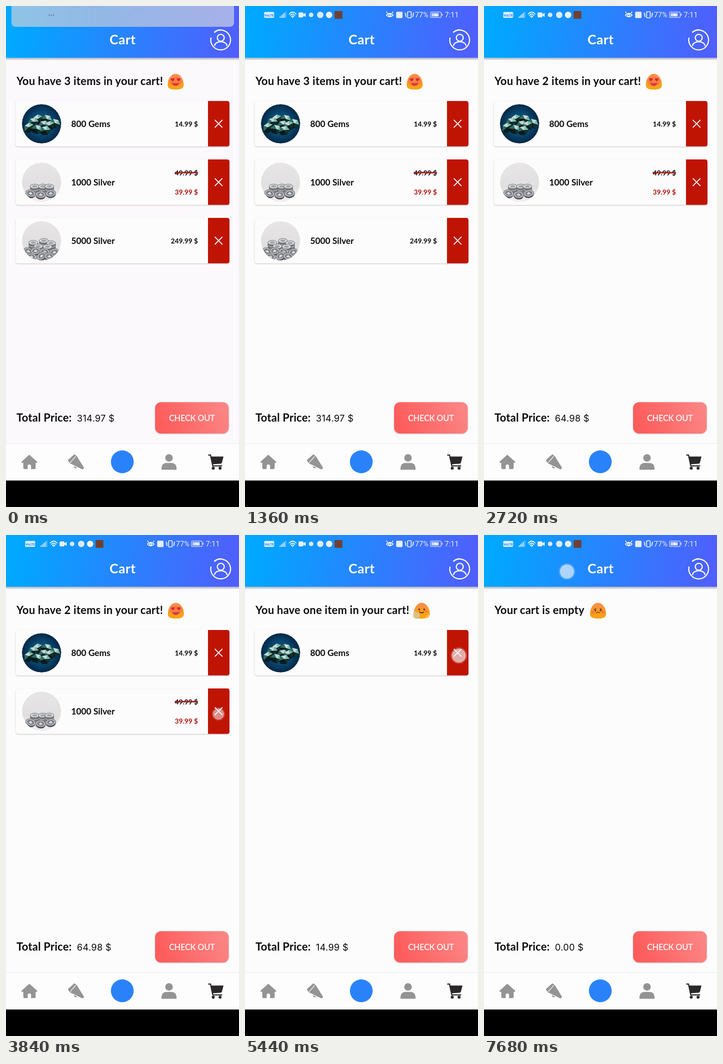
These frames come from a looping animation (511 px wide and 1097 px high, 7760 ms). An HTML page:

```html
<!DOCTYPE html>
<html lang="en">
<head>
<meta charset="utf-8">
<title>Cart</title>
<style>
  html, body { margin: 0; width: 100%; height: 100%; overflow: hidden; background: #000; }
  svg { display: block; width: 100%; height: 100%; }
  text { font-family: Lato, "Open Sans", sans-serif; font-weight: 700; fill: #0b0b0d; white-space: pre; }
  .head { font-size: 24px; letter-spacing: .27px; }
  .name { font-size: 19px; }
  .price { font-size: 15px; text-anchor: end; }
  .bar { font: 400 16px Roboto, sans-serif; fill: #e8f0ff; }
  .sum { font: 400 20px Inter, sans-serif; letter-spacing: .3px; }
  .line { fill: none; stroke: #fff; stroke-linecap: round; stroke-linejoin: round; }
</style>
</head>
<body>
<svg viewBox="0 0 511 1097" preserveAspectRatio="xMinYMin meet">
  <defs>
    <linearGradient id="sky" gradientUnits="userSpaceOnUse" x1="20" y1="30" x2="495" y2="115">
      <stop offset="0" stop-color="#00a8ff"/><stop offset="1" stop-color="#4f5ffd"/>
    </linearGradient>
    <linearGradient id="glass">
      <stop offset="0" stop-color="#8ec4e6"/><stop offset=".4" stop-color="#93b8e6"/><stop offset="1" stop-color="#a7b0ea"/>
    </linearGradient>
    <linearGradient id="coral" x1="0" y1=".3" x2="1" y2=".1">
      <stop offset="0" stop-color="#fd5d5c"/><stop offset="1" stop-color="#fb8887"/>
    </linearGradient>
    <linearGradient id="fade" x1="0" y1="0" x2="0" y2="1">
      <stop offset="0" stop-color="#556" stop-opacity=".45"/><stop offset="1" stop-color="#556" stop-opacity="0"/>
    </linearGradient>
    <linearGradient id="skin" x1="0" y1="0" x2="0" y2="1">
      <stop offset="0" stop-color="#f98a52"/><stop offset=".5" stop-color="#fb9c1e"/><stop offset="1" stop-color="#fca50c"/>
    </linearGradient>
    <radialGradient id="deep">
      <stop offset="0" stop-color="#0c5b8c"/><stop offset=".6" stop-color="#084670"/><stop offset="1" stop-color="#042744"/>
    </radialGradient>
    <linearGradient id="pale" x1="0" y1="0" x2="0" y2="1">
      <stop offset="0" stop-color="#e8e5e6"/><stop offset=".6" stop-color="#e2dfe0"/><stop offset="1" stop-color="#f0eeee"/>
    </linearGradient>
    <clipPath id="round"><circle r="43"/></clipPath>
    <filter id="soft" x="-10%" y="-10%" width="120%" height="130%">
      <feDropShadow dx="0" dy="1" stdDeviation="1.3" flood-color="#3a3550" flood-opacity=".36"/>
    </filter>
    <path id="blob" d="M-17 7C-17-6-10-17 0-17S17-6 17.3 6C17.5 14 12 16.5 0 16.5S-17 14-17 7Z"/>
    <path id="heart" d="M0 4C-7-1-3-5 0-2C3-5 7-1 0 4Z"/>
  </defs>

  <rect id="page" width="511" height="1040"/>
  <rect y="113.500" width="511" height="6" fill="url(#fade)"/>
  <rect width="511" height="113.500" fill="url(#sky)"/>
  <text x="227" y="84" style="font-size:29px;letter-spacing:.5px;fill:#fff">Cart</text>

  <g class="line" stroke-width="2.500">
    <path d="M449.500 70A21.700 21.700 0 1 0 457.500 57.200"/>
    <path d="M457.500 57.200A21.700 21.700 0 0 1 471 52.300"/>
    <circle cx="471" cy="69.500" r="7.600"/>
    <path d="M457.500 86.500C459 75.500 483 75.500 484.500 86.500"/>
  </g>

  <g id="status">
    <rect x="42" y="13" width="22" height="13" rx="2.500" fill="#dcecff"/>
    <text x="53" y="22.500" text-anchor="middle" style="font:700 7.500px Roboto,sans-serif;fill:#178ff5">VoLTE</text>
    <g id="bars" fill="#d8ebff"></g>
    <g class="line" stroke-width="1.800" stroke="#e4f0ff">
      <path d="M97 17.500Q104.500 9.500 112 17.500M99.500 20.500Q104.500 15 109.500 20.500M102 23Q104.500 20.500 107 23"/>
    </g>
    <path d="M104.500 26.500l-2-2.500h4z" fill="#e4f0ff"/>
    <rect x="117.500" y="14" width="10.500" height="11" rx="2" fill="#eaf3ff"/>
    <path d="M128 18l5-3v9l-5-3z" fill="#eaf3ff"/>
    <circle cx="145" cy="19.500" r="5" fill="#d8e8ff"/>
    <circle cx="165" cy="19.500" r="7" fill="#dcebff"/>
    <circle cx="184.500" cy="19.500" r="7" fill="#eef5ff"/>
    <rect x="196.500" y="11" width="17" height="17" fill="#6f3f35"/>
    <g class="line" stroke-width="1.700" stroke="#eef3ff">
      <path d="M310 20Q317.500 12.500 325 20Q317.500 27.500 310 20ZM312 15l-1.500-2M323 15l1.500-2"/>
      <circle cx="317.500" cy="20" r="2.300"/>
      <rect x="356.500" y="12.500" width="8" height="13.500" rx="1.500"/>
      <path d="M351.500 15v2l1.500 1.500l-1.500 1.500l1.500 1.500v2M369.500 15v2l-1.500 1.500l1.500 1.500l-1.500 1.500v2"/>
    </g>
    <rect x="331.500" y="12.500" width="14" height="14" rx="2" fill="#e6edff"/>
    <text class="bar" x="372.500" y="25">77%</text>
    <rect x="406.700" y="13.200" width="23.500" height="12" rx="2.500" fill="none" stroke="#c9d5ff" stroke-width="1.400"/>
    <rect x="409" y="15.500" width="16" height="7.500" rx="1" fill="#c9d5ff"/>
    <path d="M414 20l5-4v3h4l-5 4v-3z" fill="#fff"/>
    <rect x="431.300" y="16.500" width="2" height="5" fill="#c9d5ff"/>
    <text class="bar" x="438" y="25">7:11</text>
  </g>

  <g id="shade">
    <rect x="12.500" y="-20" width="487" height="65" rx="8" fill="url(#glass)" stroke="#b4d0f2" stroke-opacity=".7"/>
    <g fill="#6f7d9c">
      <circle cx="95" cy="20" r="1.500"/><circle cx="99.500" cy="20" r="1.500"/><circle cx="104" cy="20" r="1.500"/>
    </g>
    <path d="M146 2h24M180 2h20M279 7h20" stroke="#8292b8" stroke-opacity=".6" stroke-dasharray="2 2"/>
  </g>

  <text id="title" class="head" x="23" y="172.500"></text>
  <g id="mood"></g>
  <g id="cards"></g>

  <text class="head" x="23" y="910">Total Price:</text>
  <text id="sum" class="sum" x="155.500" y="909.500"></text>
  <rect x="327" y="867.500" width="161.500" height="68.500" rx="13" fill="url(#coral)" filter="url(#soft)"/>
  <text x="357.500" y="908.500" style="font-size:18px;letter-spacing:-.3px;fill:#ffeaea">CHECK OUT</text>

  <rect y="957" width="511" height="82" fill="#f2f0f4"/>
  <rect y="959" width="511" height="80" fill="#fdfdfd"/>
  <g fill="#949495">
    <path d="M51 982.500L68.500 998Q69 1000.500 65 1000.500V1011Q65 1014 62 1014H55V1006Q51 1001 47.500 1006V1014H41Q38 1014 38 1011V1000.500Q33 1000.500 34 998Z"/>
    <path d="M136 994L150 981.500L155.500 986L170.500 1010Q172 1014 167 1014.500L141.500 1002Q136 998 136 994Z"/>
    <path d="M140.500 1000L153 986M148 1006L157 1011Q154 1015 149 1011Z" stroke="#fdfdfd" stroke-width="1.300"/>
    <circle cx="357.500" cy="989.500" r="8.300"/>
    <path d="M341 1015.500V1011Q342 1000.500 352 1000.500H363Q373 1000.500 374 1011V1015.500Z"/>
  </g>
  <circle cx="255" cy="998" r="25" fill="#2a82fb"/>
  <g fill="#2b2829">
    <path d="M449 986.500H477L473.500 1000Q473 1002 470.500 1002.300L452.500 1003.500Z"/>
    <path d="M444.500 983.300H448.500L453.500 1007H473" fill="none" stroke="#2b2829" stroke-width="2.600" stroke-linecap="round"/>
    <circle cx="454.500" cy="1012" r="3.300"/><circle cx="469.500" cy="1012" r="3.300"/>
  </g>
  <rect y="1039" width="511" height="58"/>

  <g id="touch">
    <circle r="18.500" fill="#fff" fill-opacity=".16"/>
    <circle r="15.500" fill="#f2f4fa" fill-opacity=".62"/>
  </g>
</svg>
<script>
const $ = id => document.getElementById(id);
const LOOP = 7760, STEP = 80;

$('bars').innerHTML = [0, 1, 2, 3, 4].map(i =>
  `<rect x="${76 + i * 3.1}" y="${23 - i * 2.7}" width="2" height="${3 + i * 2.7}" opacity="${i > 3 ? .45 : 1}"/>`).join('');

// Thumbnails, centred on 0,0
function gem([x, y], i) {
  const turn = i * 47 % 70 - 35;
  return `<g transform="translate(${x} ${y}) rotate(${turn})">
    <path d="M-12 1L-5-9L7-9L13 0L5 10L-7 9Z" fill="#081a1e"/>
    <path d="M-5-9L7-9L13 0L1-1Z" fill="#c6d8d6"/>
    <path d="M13 0L7-9L4-3Z" fill="#6fb5a4"/>
    <path d="M-12 1L-5-9L1-1Z" fill="#2b7163"/>
    <path d="M1-1L13 0L5 10Z" fill="#10332f"/></g>`;
}

function stack([x, y, n]) {
  let s = '';
  for (let k = n - 1; k > 0; k--)
    s += `<ellipse cx="${x}" cy="${y + k * 3}" rx="10" ry="5" fill="${k % 2 ? '#77777b' : '#b4b4b8'}" stroke="#4e4e53" stroke-width=".6"/>`;
  return s + `<ellipse cx="${x}" cy="${y}" rx="10" ry="5" fill="#d9d9dc" stroke="#68686d"/>
    <ellipse cx="${x}" cy="${y}" rx="5.500" ry="2.600" fill="#9aa5a9"/>`;
}

// A coin leaning towards the viewer
const coin = ([x, y, turn]) => `<g transform="translate(${x} ${y}) rotate(${turn})">
  <ellipse cy="2.500" rx="11" ry="8" fill="#4b4b50"/>
  <ellipse rx="11" ry="7.500" fill="#b9b9bd" stroke="#707075"/>
  <ellipse rx="7.500" ry="4.800" fill="#77797e"/>
  <path d="M-5 1L0-3L5 1L0 3Z" fill="#d3dde0"/></g>`;

const disc = (fill, art) =>
  `<g clip-path="url(#round)"><circle r="43" fill="url(#${fill})"/>${art}</g>`;

const gems = disc('deep', [[-9, -9], [10, -10], [-19, -3], [-28, 9], [28, -1], [4, 3], [17, 5], [-11, 12], [7, 15]].map(gem).join(''));
const few = disc('pale', [[-15, 9, 5], [3, 9, 5], [17, 9, 5]].map(stack).join('')
  + [[-24, 24, 15], [20, 24, -6], [-2, 27, 4]].map(coin).join(''));
const many = disc('pale', [[-18, 4, 8], [5, 0, 9], [21, 5, 8], [-7, 12, 6], [13, 13, 6]].map(stack).join('')
  + [[-29, 23, 20], [28, 25, -15], [-13, 22, -8], [7, 24, 10], [-22, 35, 12], [0, 33, -35], [17, 34, 5]].map(coin).join(''));

const items = [
  { name: '800 Gems', pic: gems, price: '14.99 $' },
  { name: '1000 Silver', pic: few, price: '39.99 $', old: '49.99 $' },
  { name: '5000 Silver', pic: many, price: '249.99 $' }
];

function card({ name, pic, price, old }, i) {
  const cost = old
    ? `<text class="price" x="421" y="34.500">${old}</text>
       <path d="M370 29H421" stroke="#a01410" stroke-width="3"/>
       <text class="price" x="421" y="76.500" style="fill:#ae1712">${price}</text>`
    : `<text class="price" x="421" y="55.500">${price}</text>`;
  return `<g transform="translate(0 ${208 + i * 128})">
    <rect x="21.500" width="468.500" height="99.500" rx="5" fill="#fcfcfc" filter="url(#soft)"/>
    <path d="M443 0H485Q490 0 490 5V94.500Q490 99.500 485 99.500H443Z" fill="#bf1403"/>
    <path class="line" stroke-width="2" d="M458.500 42l15.500 15.500M474 42l-15.500 15.500"/>
    <g transform="translate(78 50)">${pic}</g>
    <text class="name" x="143" y="56.500">${name}</text>${cost}</g>`;
}
$('cards').innerHTML = items.map(card).join('');

// Emoji faces
const blob = '<use href="#blob" fill="url(#skin)" stroke="#ef8b1c" stroke-width=".7"/>';
const eyes = (y, r) => `<circle cx="-5.500" cy="${y}" r="${r}"/><circle cx="5.500" cy="${y}" r="${r}"/>`;
const faces = {
  love: blob + `<ellipse cy="-1" rx="14" ry="10" fill="#f4645a" opacity=".5"/>
    <g fill="#d9263d"><use href="#heart" x="-6.500" y="-5"/><use href="#heart" x="6.500" y="-5"/></g>
    <path d="M-8 2Q0 4 8 2Q6 9 0 9T-8 2Z" fill="#d8384a"/>`,
  hug: blob + `<g fill="#5a2b16">${eyes(-3, 1.900)}</g>
    <path d="M-5 2Q0 7 5 2" fill="none" stroke="#5a2b16" stroke-width="1.800"/>
    <ellipse cx="10" cy="1" rx="3" ry="2" fill="#f2623f" opacity=".7"/>
    <path d="M-17 3Q-14-2-12 3Q-5 2-4 9Q-4 16-10 17Q-18 17-18 10Z" fill="#d9c583" stroke="#b8a56a" stroke-width=".6"/>
    <path d="M7 13Q14 5 17 8Q17 15 10 16Z" fill="#fbb93c"/>`,
  sad: blob + `<g fill="#5a2b16">${eyes(-.5, 1.700)}</g>
    <path d="M-9-2L-4-5M9-2L4-5M-4.500 5Q0 .5 4.500 5" fill="none" stroke="#5a2b16" stroke-width="1.500"/>
    <g fill="#f0586a" opacity=".55"><ellipse cx="-11" cy="3" rx="4" ry="3"/><ellipse cx="11" cy="3" rx="4" ry="3"/></g>`
};

const states = [
  { at: 0, n: 3, title: 'You have 3 items in your cart!', face: 'love', x: 372, sum: '314.97 $' },
  { at: 2640, n: 2, title: 'You have 2 items in your cart!', face: 'love', x: 372.5, sum: '64.98 $' },
  { at: 4400, n: 1, title: 'You have one item in your cart!', face: 'hug', x: 387.5, sum: '14.99 $' },
  { at: 6240, n: 0, title: 'Your cart is empty', face: 'sad', x: 250, sum: '0.00 $' }
];
const taps = [
  { x: 462, y: 519, from: 2080, to: 2560 },
  { x: 466, y: 392, from: 3840, to: 4320 },
  { x: 469, y: 264, from: 5360, to: 6160 },
  { x: 182, y: 80, from: 7520, to: LOOP }
];

const clamp = v => Math.max(0, Math.min(1, v));
let shown;

function show(s) {
  if (s === shown) return;
  shown = s;
  $('title').textContent = s.title;
  $('sum').textContent = s.sum;
  $('mood').innerHTML = faces[s.face];
  $('mood').setAttribute('transform', `translate(${s.x} 166)`);
  [...$('cards').children].forEach((c, i) => c.style.display = i < s.n ? '' : 'none');
}

function draw(t) {
  show(states.filter(s => s.at <= t).pop());

  const up = clamp(t / 320);
  $('shade').setAttribute('transform', `translate(0 ${-47 * up * (2 - up)})`);
  $('status').style.opacity = clamp((t - 80) / 320);
  $('page').style.fill = `rgb(252,${249 + 3 * clamp(t / 480)},253)`;

  const tap = taps.find(p => t >= p.from && t < p.to + STEP);
  $('touch').style.display = tap ? '' : 'none';
  if (tap) {
    const grow = clamp(.8 + (t - tap.from) / 400);
    $('touch').style.opacity = t >= tap.to ? .4 : grow;
    $('touch').setAttribute('transform', `translate(${tap.x} ${tap.y}) scale(${grow})`);
  }
}

const start = performance.now();
function tick(now) {
  const t = Math.max(0, now - start) % LOOP;
  draw(Math.floor(t / STEP) * STEP);
  requestAnimationFrame(tick);
}
draw(0);
requestAnimationFrame(tick);
</script>
</body>
</html>
```
